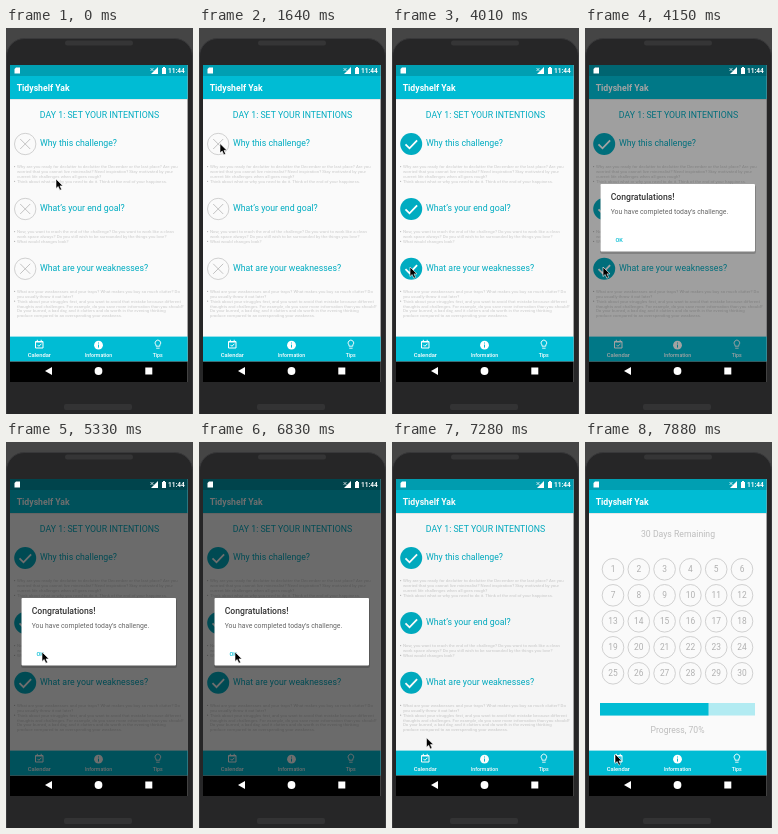
Write an HTML page that moves like this. It is 187 px wide and 386 px high and loops after 8 s.

```html
<!DOCTYPE html>
<html lang="en">
<head>
<meta charset="utf-8">
<title>Daily challenge app</title>
<style>
html, body { margin: 0; width: 100%; height: 100%; overflow: hidden; background: #454545; }
svg { display: block; width: 187px; height: 386px; font-family: Roboto, sans-serif; }
</style>
</head>
<body>
<svg id="stage" viewBox="0 0 187 386"></svg>
<script>
const CYAN = '#00bcd4', TEAL = '#00acc1';
const LEFT = 4, WIDTH = 177.6, NAV = 308.6, KEYS = 333.5;
const byId = id => document.getElementById(id);

const text = (x, y, size, fill, str, more = '') =>
  `<text x="${x}" y="${y}" font-size="${size}" fill="${fill}" ${more}>${str}</text>`;
const rect = (x, y, w, h, fill, more = '') =>
  `<rect x="${x}" y="${y}" width="${w}" height="${h}" fill="${fill}" ${more}/>`;
const disc = (x, y, r, fill) => `<circle cx="${x}" cy="${y}" r="${r}" fill="${fill}"/>`;
const ring = (x, y, r) =>
  `<circle cx="${x}" cy="${y}" r="${r}" fill="none" stroke="#c6c6c6" stroke-width=".8"/>`;
const band = (y, h, fill, more) => rect(LEFT, y, WIDTH, h, fill, more);
const MID = 'text-anchor="middle"', BOLD = 'font-weight="500"';

// Circle centre, heading, notes ("*" starts a bullet)
const questions = [
  [116, 'Why this challenge?', [
    '*Why are you ready for declutter to declutter the December or the last place? Are you',
    'worried that you cannot live minimalist? Need inspiration? Stay motivated by your',
    'current life challenges when all goes rough?',
    '*Think about what or why you need to do it. Think of the end of your happiness.']],
  [181, 'What’s your end goal?', [
    '*Now, you want to reach the end of the challenge? Do you want to work like a clean',
    'work space always? Do you still wish to be surrounded by the things you love?',
    '*What would changes look?']],
  [240.8, 'What are your weaknesses?', [
    '*What are your weaknesses and your traps? What makes you buy so much clutter? Do',
    'you usually throw it out later?',
    '*Think about your struggles first, and you want to avoid that mistake because different',
    'thoughts and challenges. For example, do you save more information than you should?',
    'Do your burned, a bad day, and it clutters and do worth in the evening thinking',
    'produce compared to an overspending your weakness.']],
];

const note = (line, y) => (line[0] === '*' ? disc(8.6, y - 1.4, .6, '#b4b4b4') : '') +
  text(11, y, 4.35, '#cacaca', line.replace('*', ''));

const question = ([cy, title, notes], i) => `
  <g id="open${i}">
    ${ring(19.2, cy, 10.7)}
    <path d="M14.200 ${cy - 5}l10 10m0 -10l-10 10" stroke="#b4b4b4" stroke-width=".8"/>
  </g>
  <g id="done${i}">
    ${disc(19.2, cy, 11, TEAL)}
    <path d="M13.500 ${cy + .3}l4 4 7.600 -8" fill="none" stroke="#fff" stroke-width="1.8"/>
  </g>
  ${text(34, cy + 2.2, 8.75, TEAL, title)}
  ${notes.map((line, n) => note(line, cy + 24 + n * 4.9)).join('')}`;

const day = (_, i) => {
  const x = 28 + i % 6 * 25.8, y = 127.3 + Math.floor(i / 6) * 26;
  return ring(x, y, 10.8) + text(x, y + 3, 8.4, '#b0b0b0', i + 1, MID);
};

byId('stage').innerHTML = `
  ${rect(.5, 10.5, 186, 400, '#262627', 'rx="18" stroke="#38383a"')}
  ${rect(59, 12.5, 68, 5, '#353536', 'rx="2.5"')}
  ${rect(58, 376, 68, 6, '#333334', 'rx="2"')}
  ${band(37, 317, '#fafafa')}
  <g id="plan">
    ${text(93.5, 89.5, 8.75, TEAL, 'DAY 1: SET YOUR INTENTIONS', MID)}
    ${questions.map(question).join('')}
  </g>
  <g id="calendar">
    ${text(93, 95, 8.7, '#bdbdbd', '30 Days Remaining', MID)}
    ${Array.from({ length: 30 }, day).join('')}
    ${rect(15, 261, 155, 12.5, '#b2ebf2')}${rect(15, 261, 155 * .7, 12.5, CYAN)}
    ${text(92.5, 291, 8.6, '#bdbdbd', 'Progress, 70%', MID)}
  </g>
  ${band(71, 1, '#000', 'opacity=".08"')}
  ${band(37, 11, '#009fb2')}
  ${band(48, 23, CYAN)}
  ${text(10.7, 62.6, 8.7, '#fff', 'Tidyshelf Yak', 'font-weight="600"')}
  ${band(NAV, KEYS - NAV, CYAN)}
  <g fill="none" stroke="#fff">
    <path d="M29.500 313.500h7.500v6.500h-7.500zM29.500 314h7.500M31.300 311.800v2M35.200 311.800v2M31.400 316.800l1.500 1.500 2.600 -2.600"/>
    <path d="M150 318.200v-1.200a2.800 2.800 0 1 1 3.800 0v1.200zM150.200 320.200h3.400" stroke-width=".9"/>
  </g>
  ${disc(92.5, 317.2, 4.4, '#fff')}
  <path d="M92.500 316.600v3M92.500 314.500v1" stroke="${CYAN}"/>
  ${text(33.3, 328.5, 5.8, '#fff', 'Calendar', MID + BOLD)}
  ${text(92.5, 328.5, 5.2, '#fff', 'Information', MID + BOLD)}
  ${text(151.7, 328.5, 5.2, '#fff', 'Tips', MID + BOLD)}
  ${band(37, KEYS - 37, '#000', 'id="dim"')}
  <g fill="#fff">
    <path d="M10 39.500h4v6h-5.500v-4.500z"/>
    <path d="M152 39v7h-7z"/>
    <path d="M144.500 40l3 3m0 -3l-3 3" stroke="#fff" stroke-width=".7"/>
    <path d="M156 40h1v-1h2v1h1v6h-4z"/>
    ${text(162, 45.2, 6.5, '#fff', '11:44', 'font-weight="600"')}
  </g>
  ${band(KEYS, 354 - KEYS, '#000')}
  <path d="M39 343l7 -4v8z" fill="#fff"/>
  ${disc(92.5, 343, 3.9, '#fff')}
  ${rect(139.3, 339.5, 7, 7, '#fff')}
  <g id="dialog">
    ${rect(15, 157, 156, 69, '#000', 'rx="2" opacity=".18"')}
    ${rect(15.5, 156, 154.5, 67.5, '#fff', 'rx="1"')}
    ${text(25.7, 172.4, 8.65, '#333', 'Congratulations!', BOLD)}
    ${text(25.7, 186, 6.85, '#666', 'You have completed today’s challenge.')}
    ${text(30.5, 214, 5.6, CYAN, 'OK', BOLD)}
  </g>
  <path id="cursor" d="M0 0v9.500l2.200 -2 1.600 3.700 1.800 -.8 -1.600 -3.500h3z" fill="#000" stroke="#fff" stroke-width=".6"/>`;

// Pointer glides: start, end, destination
const glides = [
  [450, 740, 41, 133], [1040, 1640, 21, 115.5], [2230, 2680, 23, 190],
  [3130, 4010, 18, 239], [4740, 5330, 36, 210],
  [6830, 7130, 36, 290], [7130, 7580, 30, 312],
];
const CHECKS = [2230, 3130, 4010], OPEN = 4150, CLOSE = 6980, SWITCH = 7880;

// Progress from a to b, advancing about every 150 ms like the screen recording
function progress(t, a, b) {
  const steps = Math.round((b - a) / 150);
  const u = Math.min(1, Math.max(0, (t - a) / (b - a)));
  return Math.floor(u * steps + .05) / steps;
}
const smooth = u => u * u * (3 - 2 * u);
const easeOut = u => 1 - (1 - u) ** 2.5;

const pointerAt = t => glides.reduce(([x, y], [a, b, toX, toY]) => {
  const u = smooth(progress(t, a, b));
  return [x + (toX - x) * u, y + (toY - y) * u];
}, [50, 151]);

const show = (id, on) => { byId(id).style.display = on ? '' : 'none'; };

function draw(t) {
  byId('cursor').setAttribute('transform', `translate(${pointerAt(t)})`);
  const dim = easeOut(progress(t, 4010, 4440)) - easeOut(progress(t, 6830, 7430));
  byId('dim').setAttribute('opacity', .57 * dim);
  show('plan', t < SWITCH);
  show('calendar', t >= SWITCH);
  show('dialog', t >= OPEN && t < CLOSE);
  CHECKS.forEach((time, i) => {
    show('open' + i, t < time);
    show('done' + i, t >= time);
  });
}

const start = performance.now();
function tick() {
  draw((performance.now() - start) % 8000);
  requestAnimationFrame(tick);
}
tick();
</script>
</body>
</html>
```
